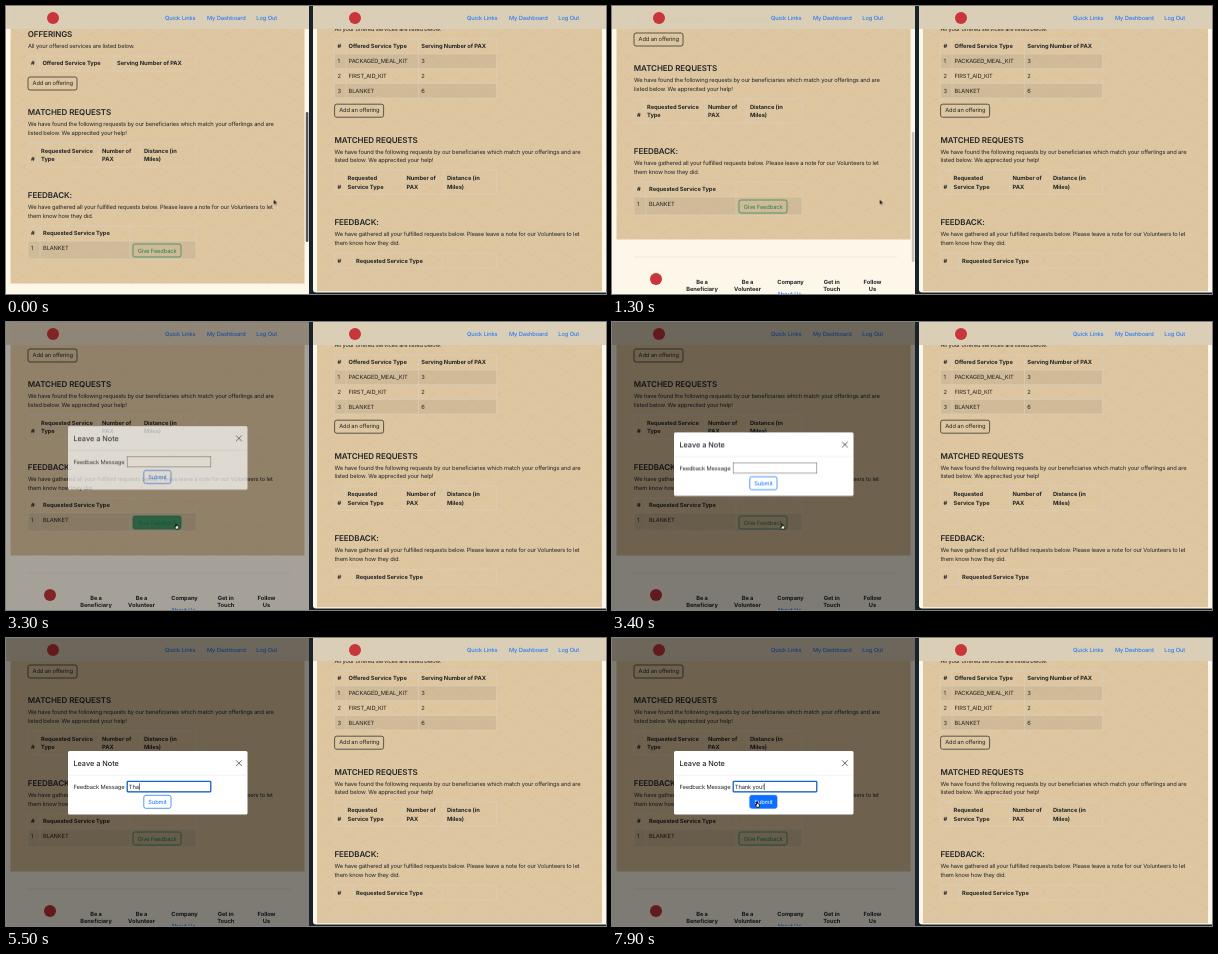
These frames come from a looping animation (600x288 px, 8000 ms). An HTML page:

```html
<!DOCTYPE html>
<html lang="en">
<head>
<meta charset="utf-8">
<title>Leave a Note</title>
<style>
html, body { margin: 0; width: 100%; height: 100%; overflow: hidden; background: #17222a; }
svg { display: block; width: 600px; height: 288px; }
text { font: 5.74px Inter, "Open Sans", sans-serif; letter-spacing: -.02em; fill: #212529; text-rendering: geometricPrecision; white-space: pre; }
.b text { font-weight: 700; letter-spacing: -.01em; }
.mid text { text-anchor: middle; }
text.h { font-size: 8px; font-weight: 600; letter-spacing: -.01em; }
text.title { font-size: 7.3px; font-weight: 500; letter-spacing: 0; }
.links text { fill: #0d6efd; letter-spacing: -.015em; }
.cream { fill: #fdf7ea; }
.tan { fill: #dec6a0; }
.nav { fill: #dbcfb8; fill-opacity: .98; }
.logo { fill: #c8353a; }
.cells { fill: none; stroke: #d9d1c1; stroke-width: .6; }
.stripe { fill: #000; fill-opacity: .06; }
.btn { fill: none; stroke: #212529; stroke-width: .7; }

/* All motion runs on the clock in --now */
.a { animation: 8s linear infinite both paused; animation-delay: var(--now); }
.page { animation-name: scroll; }
.thumb { animation-name: thumb, thumb-out; }
.veil { animation-name: fade; }
.modal { animation-name: fade, slide; }
.give { fill: #198754; fill-opacity: 0; stroke: #198754; stroke-width: .7; animation-name: press; }
.give-text { fill: #198754; }
.send { fill: #0d6efd; fill-opacity: 0; stroke: #0d6efd; stroke-width: .7; animation-name: hover; }
.send-text { fill: #0d6efd; animation-name: hover-text; }
.focus { fill: none; stroke: #1763d6; stroke-width: 1.2; animation-name: focus; }
.cursor { animation-name: move; }
.arrow { animation-name: arrow; }
.hand { animation-name: hand; }
.beam { animation-name: beam; }

@keyframes scroll {
  0% { transform: translateY(0); animation-timing-function: cubic-bezier(.2,.7,.4,1); }
  6.25% { transform: translateY(-43.6px); }
  11.25%, 100% { transform: translateY(-44px); }
}
@keyframes thumb {
  0% { transform: translateY(0); animation-timing-function: cubic-bezier(.2,.7,.4,1); }
  6.25%, 100% { transform: translateY(20px); }
}
@keyframes thumb-out { 0%, 13.75% { opacity: 1; } 17.5%, 100% { opacity: 0; } }
@keyframes fade { 0%, 39.94% { opacity: 0; } 41.81%, 100% { opacity: 1; } }
@keyframes slide {
  0%, 39.94% { transform: translateY(-18px); animation-timing-function: ease-out; }
  43.69%, 100% { transform: translateY(0); }
}
@keyframes press { 0%, 37.5% { fill-opacity: 0; } 39%, 41.25% { fill-opacity: .75; } 42.5%, 100% { fill-opacity: 0; } }
@keyframes hover { 0%, 96% { fill-opacity: 0; } 97.9%, 100% { fill-opacity: 1; } }
@keyframes hover-text { 0%, 96% { fill: #0d6efd; } 97.9%, 100% { fill: #fff; } }
@keyframes focus { 0%, 57.49% { opacity: 0; } 57.5%, 100% { opacity: 1; } }
@keyframes move {
  0%, 24% { transform: translate(267.6px, 193.4px); animation-timing-function: ease-in-out; }
  31.25% { transform: translate(238.8px, 222px); animation-timing-function: ease-in-out; }
  38.5%, 47.5% { transform: translate(170.2px, 202px); animation-timing-function: ease-in-out; }
  56.25%, 92.5% { transform: translate(150px, 149px); animation-timing-function: ease-in-out; }
  97.5%, 100% { transform: translate(145px, 164px); }
}
@keyframes arrow {
  0% { opacity: 1; animation-timing-function: step-end; }
  37.5% { opacity: 0; animation-timing-function: step-end; }
  48.75% { opacity: 1; animation-timing-function: step-end; }
  55%, 100% { opacity: 0; }
}
@keyframes hand {
  0% { opacity: 0; animation-timing-function: step-end; }
  37.5% { opacity: 1; animation-timing-function: step-end; }
  48.75% { opacity: 0; animation-timing-function: step-end; }
  96.25%, 100% { opacity: 1; }
}
@keyframes beam {
  0% { opacity: 0; animation-timing-function: step-end; }
  55% { opacity: 1; animation-timing-function: step-end; }
  65% { opacity: 0; animation-timing-function: step-end; }
  92.5% { opacity: 1; animation-timing-function: step-end; }
  96.25%, 100% { opacity: 0; }
}
</style>
</head>
<body>
<svg viewBox="0 0 600 288">
  <defs>
    <pattern id="weave" width="34" height="22" patternUnits="userSpaceOnUse">
      <path d="M0 22Q8 6 34 0M0 0Q20 5 34 22M6 22L20 4M14 22L28 8" fill="none" stroke="#8d6b35" stroke-opacity=".06" stroke-width=".6"/>
    </pattern>
    <clipPath id="left"><rect width="303" height="288"/></clipPath>
    <g id="nav">
      <rect class="nav" width="303" height="23"/>
      <circle class="logo" cx="47" cy="12" r="6"/>
      <g class="links"><text x="159" y="14">Quick Links</text><text x="201" y="14">My Dashboard</text><text x="250.3" y="14">Log Out</text></g>
    </g>
    <g id="add">
      <rect class="btn" x="22" y="71" width="49" height="13" rx="2"/>
      <text x="26.6" y="79.3">Add an offering</text>
    </g>
    <g id="matched">
      <text class="h" x="21.8" y="109.3">MATCHED REQUESTS</text>
      <text x="22" y="120.3">We have found the following requests by our beneficiaries which match your offerlings and are</text>
      <text x="22" y="128.9">listed below. We apprecited your help!</text>
    </g>
    <g id="feedback">
      <text class="h" x="21.8" y="191.9">FEEDBACK:</text>
      <text x="22" y="203">We have gathered all your fulfilled requests below. Please leave a note for our Volunteers to let</text>
      <text x="22" y="211.6">them know how they did.</text>
    </g>
  </defs>

  <g clip-path="url(#left)">
    <rect class="cream" width="303" height="288"/>
    <g class="a page">
      <rect class="tan" x="4.5" y="-5" width="294" height="282.5"/>
      <rect fill="url(#weave)" x="4.5" y="-5" width="294" height="282.5"/>
      <text class="h" x="21.8" y="30.5">OFFERINGS</text>
      <text x="22" y="41.6">All your offered services are listed below.</text>
      <path class="cells" d="M22 50H190V65H22ZM33.5 50V65M108 50V65"/>
      <g class="b"><text x="25" y="59.4">#</text><text x="36.5" y="59.4">Offered Service Type</text><text x="111" y="59.4">Serving Number of PAX</text></g>
      <use href="#add"/>
      <use href="#matched"/>
      <path class="cells" d="M22 137H190V161H22ZM32 137V161M93 137V161M135 137V161"/>
      <g class="b">
        <text x="25" y="155.4">#</text>
        <text x="35" y="146.8">Requested Service</text><text x="35" y="155.4">Type</text>
        <text x="96" y="146.8">Number of</text><text x="96" y="155.4">PAX</text>
        <text x="138" y="146.8">Distance (in</text><text x="138" y="155.4">Miles)</text>
      </g>
      <use href="#feedback"/>
      <rect class="stripe" x="22" y="235" width="168" height="18"/>
      <path class="cells" d="M22 220H190V253H22ZM22 235H190M34 220V253M124 220V253"/>
      <g class="b"><text x="25" y="229.4">#</text><text x="37" y="229.4">Requested Service Type</text></g>
      <text x="25" y="244.2">1</text><text x="37" y="244.2">BLANKET</text>
      <rect class="a give" x="127" y="238" width="48" height="13" rx="2"/>
      <text class="give-text" x="131.7" y="246.5">Give Feedback</text>

      <path d="M22 295H285" stroke="#ddd8cc" stroke-width=".5"/>
      <circle class="logo" cx="44" cy="317" r="6"/>
      <g class="b mid">
        <text x="90" y="322">Be a</text><text x="90" y="328.9">Beneficiary</text>
        <text x="135.5" y="322">Be a</text><text x="135.5" y="328.9">Volunteer</text>
        <text x="178.5" y="322">Company</text>
        <text x="219.7" y="322">Get in</text><text x="219.7" y="328.9">Touch</text>
        <text x="260.5" y="322">Follow</text><text x="260.5" y="328.9">Us</text>
      </g>
      <g class="links mid"><text x="177.2" y="333.8">About Us</text></g>
    </g>
    <use href="#nav"/>
    <rect class="a thumb" x="299.8" y="106" width="2.6" height="130" rx="1.3" fill="#5b5a57"/>
    <rect class="a veil" width="303" height="288" fill="#000" fill-opacity=".5"/>

    <g class="a modal">
      <rect x="62" y="113" width="179.5" height="63.5" rx="1.6" fill="#fff"/>
      <path d="M62 137.2H241.5" stroke="#dee2e6" stroke-width=".5"/>
      <text class="title" x="67.4" y="127.7">Leave a Note</text>
      <path d="M230.3 122.6L235.5 127.8M235.5 122.6L230.3 127.8" stroke="#444" stroke-width=".8" stroke-linecap="round"/>
      <text x="67.4" y="150.8">Feedback Message</text>
      <rect x="121.2" y="143.4" width="83.6" height="10.4" fill="#fff" stroke="#77705f" stroke-width=".6"/>
      <rect class="a focus" x="121.2" y="143.4" width="83.6" height="10.4" rx=".8"/>
      <text id="note" x="122.8" y="150.8"></text>
      <rect id="caret" y="145.3" width=".6" height="6.8" fill="#111"/>
      <rect class="a send" x="137.8" y="157.3" width="27.2" height="13" rx="2"/>
      <g class="mid"><text class="a send-text" x="151.4" y="165.8">Submit</text></g>
    </g>

    <g class="a cursor">
      <path class="a arrow" d="M0 0V5.2L1.2 4.1 2.1 6 2.9 5.6 2.1 3.8H3.7Z" fill="#000" stroke="#fff" stroke-width=".3"/>
      <path class="a hand" d="M-.5 0Q0-.6.5 0V1.7L2.2 2.2Q2.7 2.4 2.6 3L2.1 5.2H-.5L-1.9 3Q-1.6 2.3-.5 3.2Z" fill="#fff" stroke="#000" stroke-width=".8"/>
      <path class="a beam" d="M-1-2.8Q0-2.8 0-2.2V2.2Q0 2.8-1 2.8M1-2.8Q0-2.8 0-2.2M0 2.2Q0 2.8 1 2.8" fill="none" stroke="#222" stroke-width=".5"/>
    </g>
  </g>

  <g>
    <path class="cream" d="M307 0H600V286.5H310Q307 286.5 307 283.5Z"/>
    <rect class="tan" x="311" width="285" height="285.3"/>
    <rect fill="url(#weave)" x="311" width="285" height="285.3"/>
    <text x="328.5" y="24.6">All your offered services are listed below.</text>
    <path class="stripe" d="M328.5 48H490.5V62.7H328.5ZM328.5 77.4H490.5V92H328.5Z"/>
    <path class="cells" d="M328.5 33H490.5V92H328.5ZM328.5 48H490.5M328.5 62.7H490.5M328.5 77.4H490.5M340 33V92M412.5 33V92"/>
    <g class="b"><text x="331.5" y="42.4">#</text><text x="342.6" y="42.4">Offered Service Type</text><text x="415.2" y="42.4">Serving Number of PAX</text></g>
    <text x="331.5" y="57.2">1</text><text x="342.6" y="57.2">PACKAGED_MEAL_KIT</text><text x="415.2" y="57.2">3</text>
    <text x="331.5" y="72">2</text><text x="342.6" y="72">FIRST_AID_KIT</text><text x="415.2" y="72">2</text>
    <text x="331.5" y="86.8">3</text><text x="342.6" y="86.8">BLANKET</text><text x="415.2" y="86.8">6</text>
    <use href="#add" x="306.6" y="27.2"/>
    <use href="#matched" x="306.6" y="27.4"/>
    <path class="cells" d="M328.5 164H490.5V188.4H328.5ZM339 164V188.4M398 164V188.4M438 164V188.4"/>
    <g class="b">
      <text x="331.5" y="182.7">#</text>
      <text x="341.5" y="174.1">Requested</text><text x="341.5" y="182.7">Service Type</text>
      <text x="400.5" y="174.1">Number of</text><text x="400.5" y="182.7">PAX</text>
      <text x="441" y="174.1">Distance (in</text><text x="441" y="182.7">Miles)</text>
    </g>
    <use href="#feedback" x="306.6" y="27.4"/>
    <path class="cells" d="M328.5 247.3H490.5V262.2H328.5ZM347 247.3V262.2M436 247.3V262.2"/>
    <g class="b"><text x="331.5" y="256.7">#</text><text x="350" y="256.7">Requested Service Type</text></g>
    <svg x="307" width="293" height="23"><use href="#nav" x="-5"/></svg>
  </g>
</svg>
<script>
const LOOP = 8000, STEP = 100, FOCUS = 4600;
const message = "Thank you!";
const keys = [5200, 5300, 5500, 5700, 5800, 6000, 6200, 6300, 6500, 6900];
const note = document.getElementById("note");
const caret = document.getElementById("caret");

function draw(now) {
  const t = Math.floor((now % LOOP) / STEP) * STEP;
  const typed = keys.filter(k => k <= t).length;
  const last = typed ? keys[typed - 1] : FOCUS;
  document.documentElement.style.setProperty("--now", -t + "ms");
  note.textContent = message.slice(0, typed);
  caret.setAttribute("x", 123 + (typed ? note.getComputedTextLength() : 0));
  caret.setAttribute("opacity", t >= FOCUS && Math.floor((t - last) / 500) % 2 === 0 ? 1 : 0);
}

let start;
function tick(now) {
  start ??= now;
  draw(now - start);
  requestAnimationFrame(tick);
}
draw(0);
requestAnimationFrame(tick);
</script>
</body>
</html>
```
